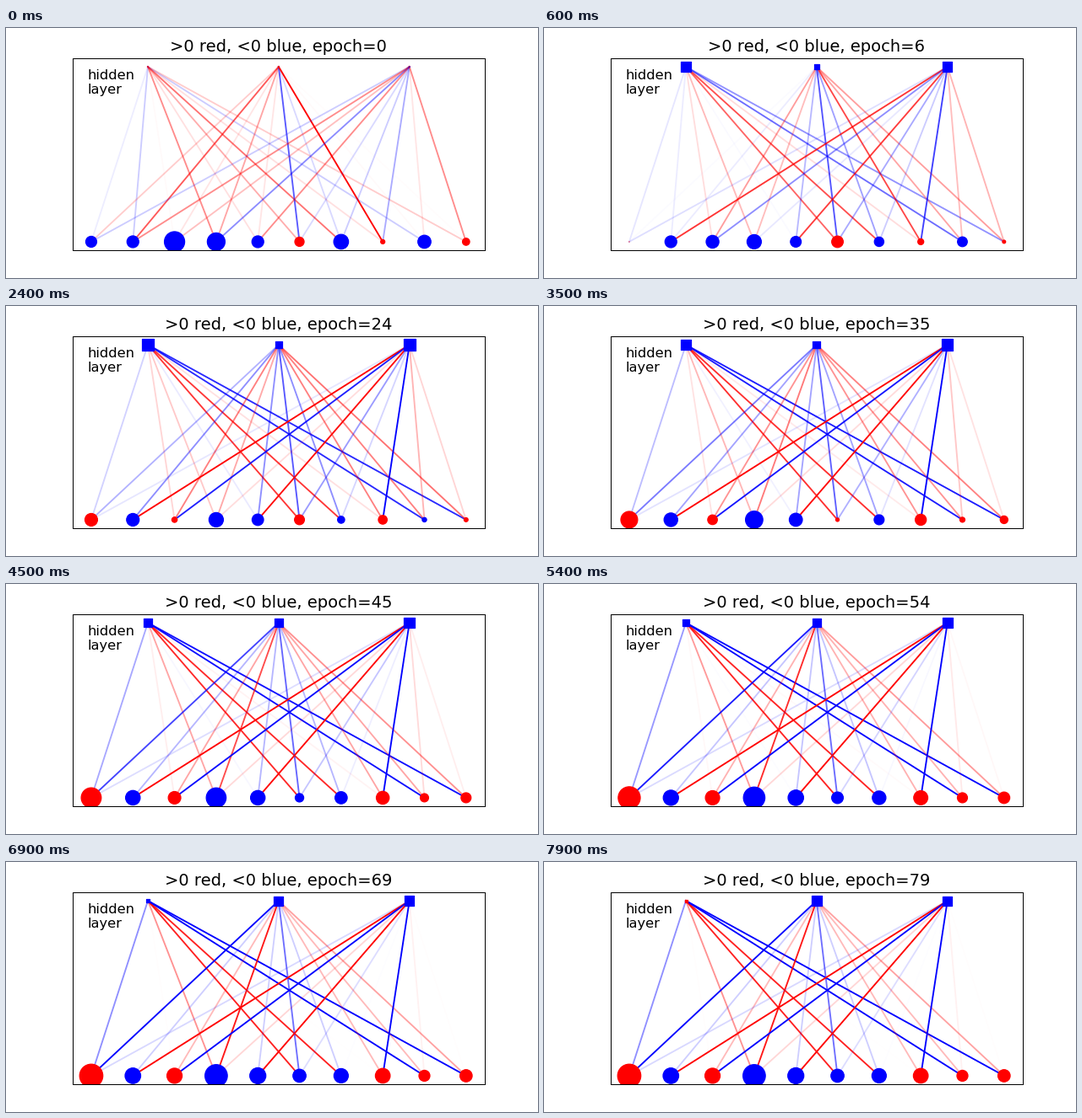
Animation, 630 px wide and 297 px high, one loop 8 s. Source, as a matplotlib script:

```python
import numpy as np
import matplotlib.pyplot as plt
from matplotlib.animation import FuncAnimation

plt.rcParams.update({"font.family": "DejaVu Sans", "font.size": 13})

EPOCHS = 80
DPI = 90
PX = 72 / DPI  # points per pixel

OUT_X = np.arange(10)
HID_X = 4.5 + 3.14 * np.array([-1, 0, 1])

# Signed weights, one row per hidden unit: untrained, and after the quick phase
W_START = np.array([
    [-.07, -.2, .02, .45, .12, .32, .55, .12, -.2, .2],
    [.2, .65, .1, .35, .1, -.65, -.15, 1, .02, .01],
    [-.2, .45, .25, -.45, .45, -.15, -.2, -.33, .1, .45],
])
W_QUICK = np.array([
    [-.115, 0, .2, .165, -.1, .77, .77, .15, -.8, -.8],
    [-.145, -.5, .55, .205, -.5, -.68, -.5, .55, .55, .6],
    [-.085, 1, -.85, .125, .95, -.45, -.2, -1, .35, .2],
])

# Signed marker sizes in pixels: untrained, after the quick phase, settled
OUT_SIZES = ([-13, -14, -24, -21, -14, 11, -17.5, 5, -15.5, 8.5],
             [10, -14, -5, -14, -12, 15, -4.5, 8, -8.5, -4.5],
             [27.5, -18.5, 18, -26.5, -19, -15.5, -17, 17.5, 13, 14.5])
HID_SIZES = ([-.5] * 3, [-14.5, -7, -14], [3, -11.5, -11])


def ramp(t, start, end):
    return np.clip((t - start) / (end - start), 0, 1)


def smooth(x):
    return x * x * (3 - 2 * x)


def train(t, start, quick, late, slow):
    """Fast, flattening move to the quick state, then a slow drift."""
    fast = 1 - (1 - ramp(t, 0, 13)) ** 1.6
    return start + (quick - start) * fast + (late - quick) * slow


def settle(quick):
    """Strong weights saturate, weak ones fade; two outputs keep growing."""
    growth = np.ones(10)
    growth[[0, 3]] = 5.5, 3.8
    strength = np.abs(quick) * growth
    return np.sign(quick) * np.minimum((strength / .8) ** 3.5, 1)


def areas(sizes):
    return [np.sign(s) * np.square(s) for s in sizes]


def tint(v):
    return "red" if v > 0 else "blue"


W_LATE = settle(W_QUICK)
OUT_AREAS, HID_AREAS = areas(OUT_SIZES), areas(HID_SIZES)

fig, ax = plt.subplots(figsize=(7, 3.3), dpi=DPI)
ax.set(xlim=(-.45, 9.45), ylim=(-.05, 1.05), xticks=[], yticks=[])
ax.text(-.1, .83, "hidden\nlayer", va="bottom")
title = ax.set_title("")

links = [ax.plot([h, o], [1, 0], lw=1.5)[0] for h in HID_X for o in OUT_X]
outputs = ax.scatter(OUT_X, 0 * OUT_X, marker="o", zorder=2.2)
hidden = ax.scatter(HID_X, 0 * HID_X + 1, marker="s", zorder=2.2)


def paint(nodes, area):
    nodes.set_sizes(np.abs(area) * PX ** 2)
    nodes.set_color([tint(a) for a in area])


def draw(epoch):
    title.set_text(f">0 red, <0 blue, epoch={epoch}")
    slow = smooth(ramp(epoch, 8, 66))
    weights = train(epoch, W_START, W_QUICK, W_LATE, slow)
    for line, w in zip(links, weights.flat):
        line.set_color(tint(w))
        line.set_alpha(min(abs(w), 1))
    paint(outputs, train(epoch, *OUT_AREAS, slow))
    paint(hidden, train(epoch, *HID_AREAS, ramp(epoch, 13, 79)))
    return [title, *links, outputs, hidden]


anim = FuncAnimation(fig, draw, frames=EPOCHS, interval=100, repeat=True,
                     repeat_delay=0, blit=False)
plt.show()
```
